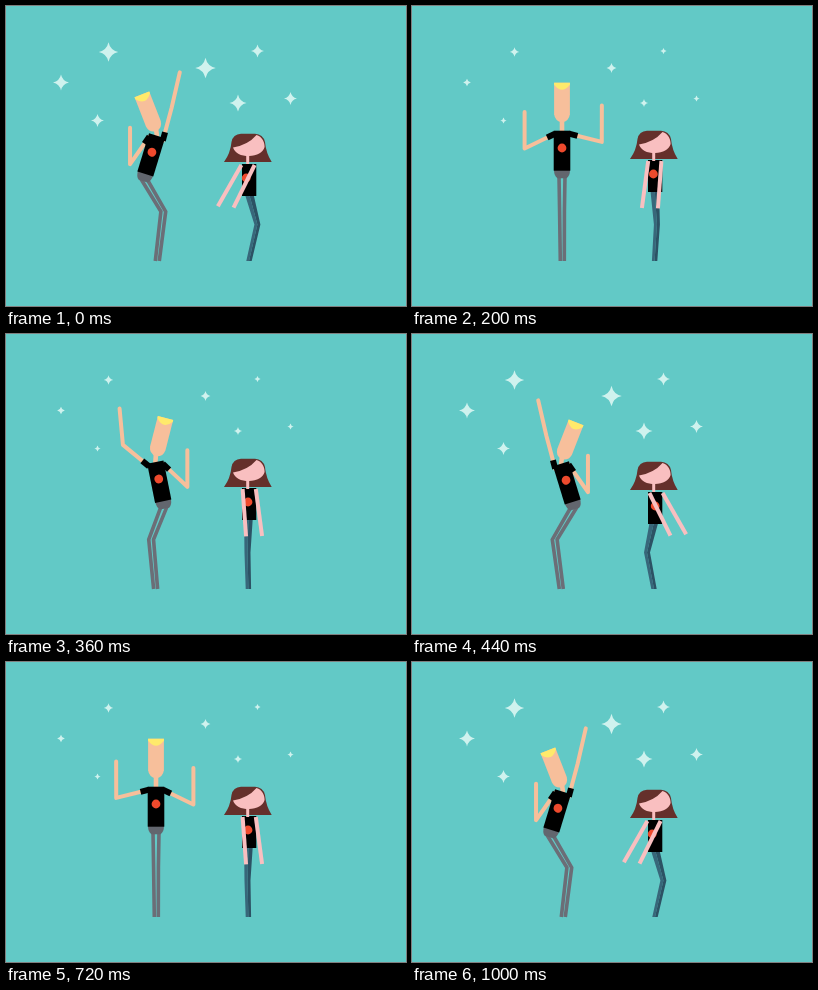
Write an HTML page that moves like this. It is 400 by 300 pixels and loops after 1040 ms.

```html
<!DOCTYPE html>
<html lang="en">
<head>
<meta charset="utf-8">
<title>Dancers</title>
<style>
  html, body { margin: 0; width: 100%; height: 100%; overflow: hidden; background: #62c9c6; }
  svg { display: block; width: 100%; height: 100%; }
</style>
</head>
<body>
<svg viewBox="0 0 400 300" fill="none">
  <g id="stars" fill="#cff2ee"></g>

  <g id="man">
    <g stroke="#6b6e77" stroke-width="3.6">
      <path id="legL"/><path id="legR"/>
    </g>
    <g stroke="#f7bf9b" stroke-width="4" stroke-linecap="round" stroke-linejoin="round">
      <path id="armL"/><path id="armR"/>
    </g>
    <path id="neck" stroke="#f7bf9b" stroke-width="4.6"/>
    <g stroke="#000" stroke-width="6">
      <path id="sleeveL"/><path id="sleeveR"/>
    </g>
    <g id="torso">
      <path fill="#62666e" d="M-8 39H8Q8 45 4.6 47.5H-4.6Q-8 45 -8 39Z"/>
      <path fill="#000" d="M-8.3 0H8.3V40H-8.3Z"/>
      <circle cx="0" cy="17.3" r="4.4" fill="#ee4a2d"/>
    </g>
    <g id="head">
      <path fill="#f7bf9b" d="M-7.9 -38.5H7.9V-7Q7 0 0 1Q-7 0 -7.9 -7Z"/>
      <path fill="#ffea6b" d="M-7.9 -38.5H7.9V-36.5Q0 -26.5 -7.9 -36.5Z"/>
    </g>
  </g>

  <g id="girl">
    <path id="shinL" fill="#38677a"/><path id="shinR" fill="#2c5264"/>
    <g id="shirt">
      <path fill="#000" d="M236 0H250.3V32H236Z"/>
      <circle id="badge" cy="14" r="4.4" fill="#ee4a2d"/>
    </g>
    <g stroke="#f9bfc0" stroke-width="4">
      <path id="handL"/><path id="handR"/>
    </g>
    <g id="bob">
      <path fill="#65302b" d="M235 124.7H249Q257 125 259 133Q260 144 265.7 153H218Q224.5 144 225.5 133Q227 125 235 124.7Z"/>
      <path stroke="#f9bfc0" stroke-width="3" d="M241.7 145V155"/>
      <path fill="#f9bfc0" d="M227 138.5Q242 136 250.5 126C256 127.5 258.8 133 258.6 138C257 143.500 251 147 243 147C235 147 229 144.500 227 138.5Z"/>
    </g>
  </g>
</svg>
<script>
  const STEP = 40, LOOP = 1040, HALF = LOOP / 2, SWING = 440, REST = 0.21;
  const $ = id => document.getElementById(id);
  const rad = deg => deg * Math.PI / 180;
  const draw = (id, ...points) =>
    $(id).setAttribute('d', 'M' + points.map(p => p.map(v => v.toFixed(2)).join()).join('L'));
  const place = (id, x, y, turn = 0) =>
    $(id).setAttribute('transform', `translate(${x} ${y}) rotate(${turn})`);

  // x, y, radius at the beat
  const stars = [
    [102.5, 46, 9.7], [55, 76.5, 8], [91.5, 114.5, 6.5], [199.5, 62, 10.3],
    [251.5, 45, 6.5], [232, 97, 8.5], [284.5, 92.5, 6.5]
  ].map(([x, y, r]) => {
    const el = document.createElementNS('http://www.w3.org/2000/svg', 'path');
    el.setAttribute('d', 'M0 -1Q.18 -.18 1 0Q.18 .18 0 1Q-.18 .18 -1 0Q-.18 -.18 0 -1Z');
    $('stars').append(el);
    return { el, x, y, r };
  });

  // Linear interpolation through [position, value] pairs
  function track(keys, t) {
    const i = keys.findIndex(k => k[0] > t);
    if (i < 0) return keys[keys.length - 1][1];
    const [t0, v0] = keys[i - 1], [t1, v1] = keys[i];
    return v0 + (v1 - v0) * (t - t0) / (t1 - t0);
  }
  const bodyKeys = [[0, -1], [200, 0], [SWING, 1]];
  const armKeys = [[0, -1], [SWING, 1]];
  const girlKeys = [[0, -1], [120, -REST], [200, -REST], [360, REST], [SWING, 1]];
  const upperArmKeys = [[-1, -55], [0, -23], [1, 75]];

  // Point at a distance from p; angle rises from the horizontal, side is -1 or 1
  const reach = ([x, y], angle, length, side) =>
    [x + side * length * Math.cos(rad(angle)), y - length * Math.sin(rad(angle))];

  function drawMan(s, swing) {
    const bend = Math.abs(s), turn = -17 * s;
    const top = [150 - s, 124.7 + 5 * bend];
    const c = Math.cos(rad(turn)), n = Math.sin(rad(turn));
    const local = (x, y) => [top[0] + x * c - y * n, top[1] + x * n + y * c];
    const chin = [150, 115.3 + 9 * bend];

    place('torso', ...top, turn);
    place('head', ...chin, 21.5 * s);
    draw('neck', [chin[0], chin[1] - 2], [top[0], top[1] + 1]);

    const hip = local(0, 45);
    for (const [name, side] of [['L', -1], ['R', 1]]) {
      draw('leg' + name,
        [hip[0] + side * 3, hip[1]],
        [150 - 7.3 * s + side * 2.4, 205.5],
        [150.3 - s + side * 2, 255]);

      const lift = -side * swing;
      const shoulder = local(side * 7, 3);
      const upper = track(upperArmKeys, lift);
      const fore = 90 - 13 * Math.max(lift, 0) ** 2;
      const elbow = reach(shoulder, upper, 33.8, side);
      draw('arm' + name, shoulder, elbow, reach(elbow, fore, 36.5, side));
      draw('sleeve' + name, shoulder, reach(shoulder, upper, 8.7, side));
    }
  }

  function drawGirl(g, beat) {
    const top = 154 + 4 * beat, hipY = top + 31;
    place('shirt', 0, top);
    place('bob', 0, 3 * beat);
    $('badge').setAttribute('cx', 241.7 + 1.5 * g);

    const hip = 242.6 - 0.8 * g, knee = 243.2 - 8.2 * g, foot = 242.5 - 0.5 * g;
    for (const [name, side] of [['L', -1], ['R', 1]]) {
      draw('shin' + name,
        [hip, hipY], [knee, 218.5], [foot, 255],
        [foot + side * 2.7, 255], [knee + side * 3, 218.5], [hip + side * 4.3, hipY]);

      const angle = rad(28 * g + side * 1.7);
      const x = 243 + side * 6.6 + g, y = top + 1;
      draw('hand' + name, [x, y], [x + 47.5 * Math.sin(angle), y + 47.5 * Math.cos(angle)]);
    }
  }

  function render(ms) {
    const t = Math.floor(ms / STEP) * STEP % LOOP;
    const dir = t < HALF ? 1 : -1, u = t % HALF;
    const g = dir * track(girlKeys, u);
    const beat = Math.max(0, (Math.abs(g) - REST) / (1 - REST));

    drawMan(dir * track(bodyKeys, u), dir * track(armKeys, u));
    drawGirl(g, beat);
    for (const { el, x, y, r } of stars)
      el.setAttribute('transform', `translate(${x} ${y}) scale(${r * (0.48 + 0.52 * beat)})`);
  }

  const start = performance.now();
  function tick() {
    render(performance.now() - start);
    requestAnimationFrame(tick);
  }
  tick();
</script>
</body>
</html>
```
